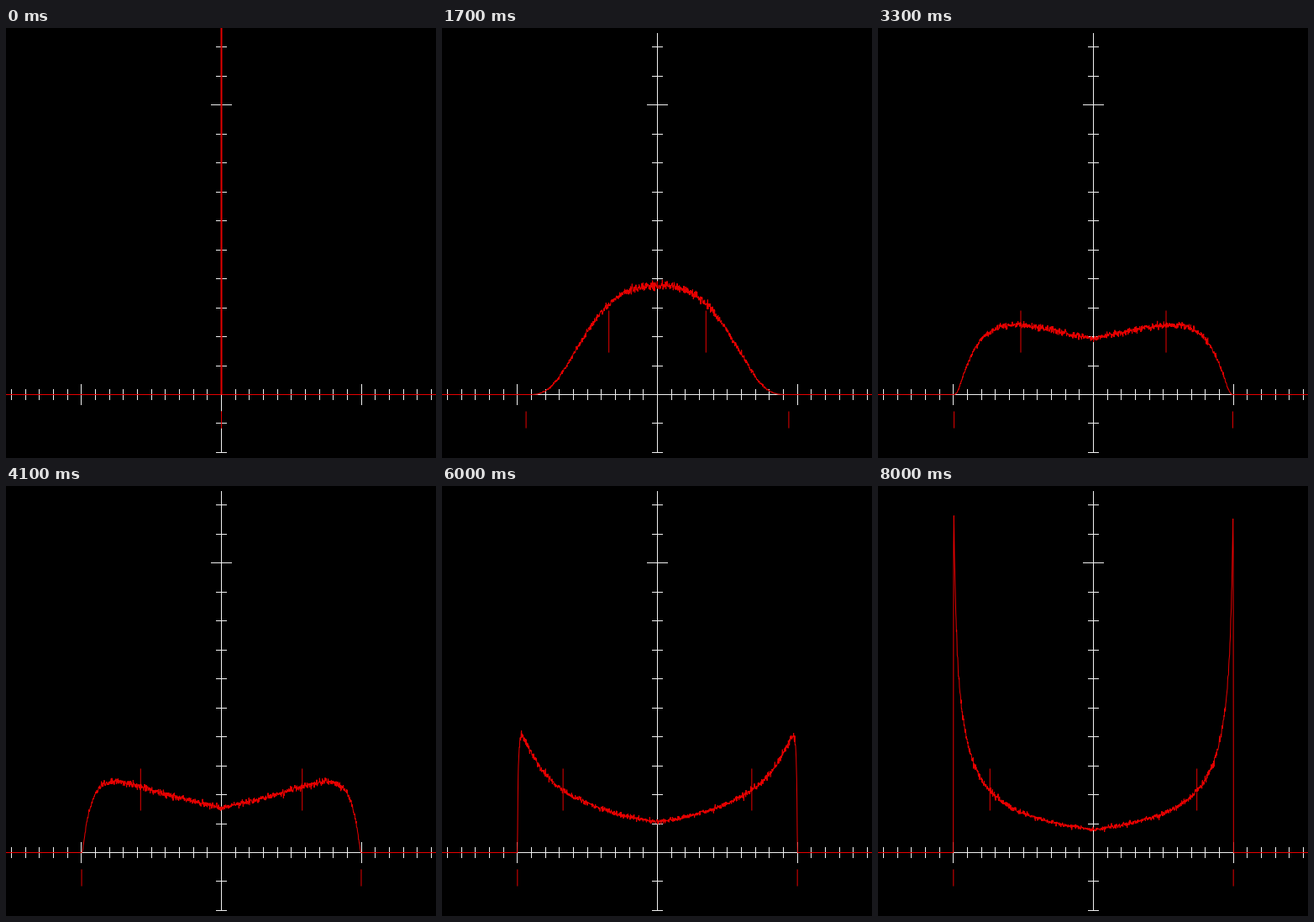
These frames come from a looping animation (512x512 px, 8.1 s). A matplotlib script:

```python
import numpy as np
import matplotlib.pyplot as plt
from matplotlib.animation import FuncAnimation

SIZE, FRAMES, INTERVAL = 512, 81, 100
CX, CY = 256.5, 436.5
UNIT, TICK_Y = 500 / 3, 34.48   # pixels per unit of x, pixels per y tick
PX = 0.72                       # one pixel in points
BIN = 1 / 3                     # histogram bin width in pixels
HEIGHT = 219.0
U_MAX = 1.64
RED, WHITE = "#e60000", "#f0f0f0"

# Density of the underlying variable u and its odd cumulative function
u = np.linspace(0, 1.8, 6001)
density = np.exp(-1.5 * u - 3.65 * u**2 - 0.4 * u**4)
du = u[1] - u[0]
cumulative = np.concatenate([[0], np.cumsum((density[1:] + density[:-1]) / 2 * du)])
weights = density / density.sum()

edges = np.arange(-771, 772) * BIN
centers = (edges[1:] + edges[:-1]) / 2

fig = plt.figure(figsize=(SIZE / 100, SIZE / 100), dpi=100, facecolor="black")
ax = fig.add_axes([0, 0, 1, 1])
ax.set_xlim(0, SIZE)
ax.set_ylim(SIZE, 0)
ax.axis("off")


def segment(x, y, color=WHITE):
    return ax.plot(x, y, color=color, lw=PX, snap=False,
                   solid_capstyle="butt")[0]


def pixel_center(v):
    return np.floor(v) + 0.5


def draw_axes():
    segment([0, SIZE], [CY, CY])
    segment([CX, CX], [6, 506])
    for k in range(-15, 16):
        if k:
            x, r = pixel_center(CX + k * UNIT / 10), 12.5 if k % 10 == 0 else 6.5
            segment([x, x], [CY - r, CY + r])
    for k in range(-2, 13):
        if k:
            y, r = pixel_center(CY - k * TICK_Y), 12.5 if k == 10 else 6.5
            segment([CX - r, CX + r], [y, y])


draw_axes()
curve = ax.plot([], [], color=RED, lw=PX, snap=False,
                solid_joinstyle="bevel")[0]
spread = [segment([], [], RED) for _ in range(2)]
extent = [segment([], [], RED) for _ in range(2)]


def histogram(t, seed):
    """Heights in pixels of x = sign(u) * (1 - exp(-|u| t))."""
    x = edges / UNIT
    reach = -np.log(np.maximum(1 - np.abs(x), 1e-200)) / max(t, 1e-9)
    mass = np.diff(np.sign(x) * np.interp(reach, u, cumulative))
    h = mass * HEIGHT * UNIT / BIN
    noise = np.random.default_rng(seed).standard_normal(h.size)
    return np.clip(h + 0.23 * np.sqrt(np.maximum(h, 0)) * noise, 0, 5000)


def place(pair, offset, top, bottom):
    for line, side in zip(pair, (-1, 1)):
        x = CX + side * offset
        line.set_data([x, x], [top, bottom])


def update(i):
    t = i * INTERVAL / 1000
    curve.set_data(CX + centers, CY - histogram(t, i))
    deviation = np.sqrt(np.sum(weights * (1 - np.exp(-u * t)) ** 2))
    place(spread, UNIT * deviation, 336.5, 386.5)
    place(extent, UNIT * (1 - np.exp(-U_MAX * t)), 456.5, 476.5)
    return [curve, *spread, *extent]


anim = FuncAnimation(fig, update, frames=FRAMES, interval=INTERVAL,
                     repeat=True, repeat_delay=0, blit=False)
plt.show()
```
